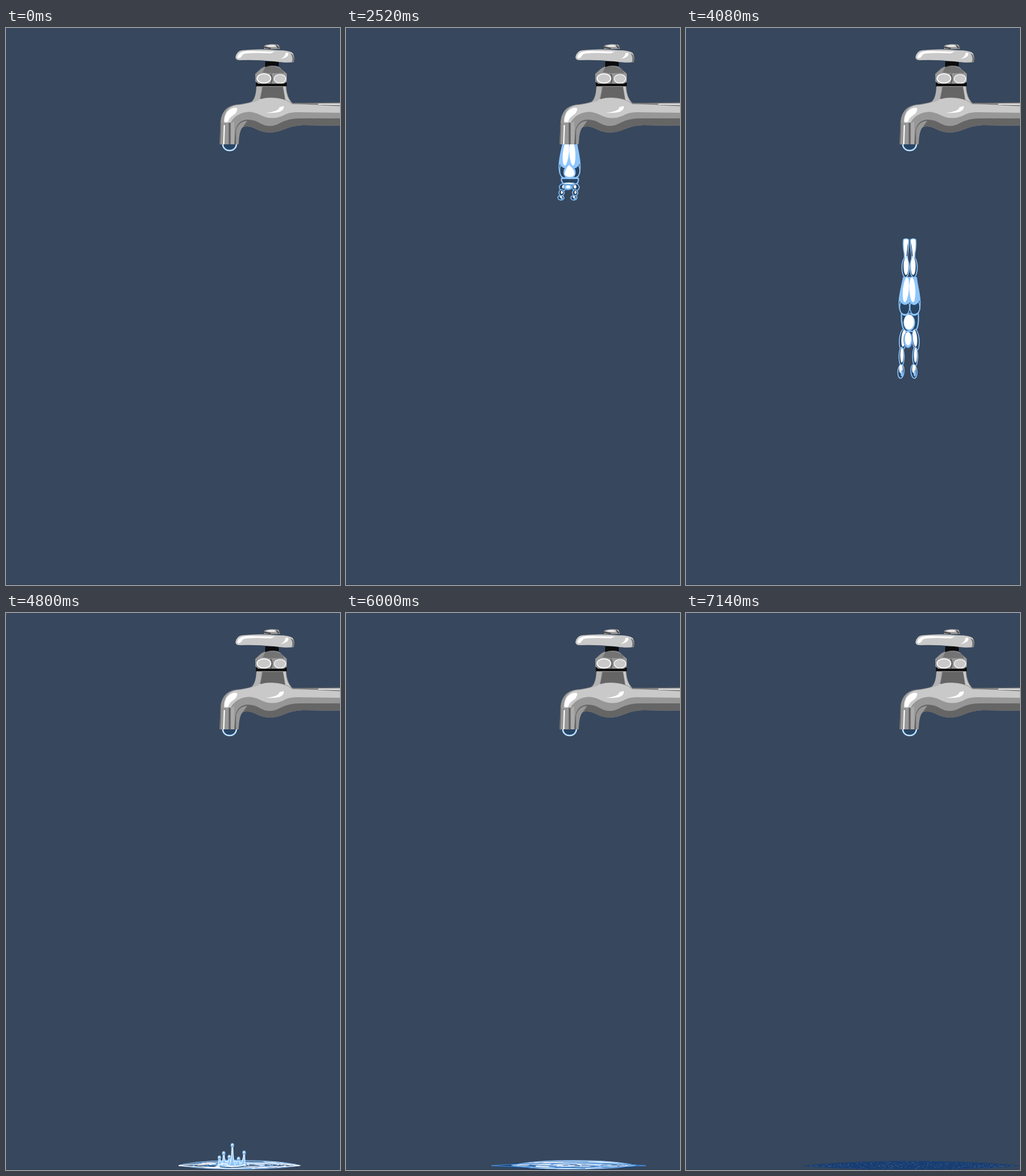
Recreate the animation shown at these times as an HTML page with a canvas. Size 540 by 900 pixels, loop 7.2 s.

```html
<!DOCTYPE html>
<html lang="en">
<head>
<meta charset="utf-8">
<title>Tap</title>
<style>
html, body { margin: 0; width: 100%; height: 100%; overflow: hidden; background: #37475d; }
canvas { display: block; }
</style>
</head>
<body>
<canvas id="stage" width="540" height="900"></canvas>
<script>
const ctx = document.getElementById('stage').getContext('2d');
const LOOP = 7200, STEP = 60, LIP = 188, CX = 361.5, FLOOR = 893;
const BG = '#37475d', NAVY = '#294564', SKY = '#8ec6fb', MID = '#4b8fd6', WHITE = '#fff';
const LIGHT = '#c9c9c9', GREY = '#979797', DARK = '#656565';

const clamp = v => Math.max(0, Math.min(1, v));

// Linear interpolation through [time, value] pairs
function track(t, keys) {
  if (t <= keys[0][0]) return keys[0][1];
  for (let i = 1; i < keys.length; i++) {
    const [t1, v1] = keys[i], [t0, v0] = keys[i - 1];
    if (t <= t1) return v0 + (v1 - v0) * (t - t0) / (t1 - t0);
  }
  return keys[keys.length - 1][1];
}

function random(seed) {
  return () => (seed = (seed * 16807) % 2147483647) / 2147483647;
}

function paint(path, fill, stroke, width = 1) {
  if (fill) { ctx.fillStyle = fill; ctx.fill(path); }
  if (stroke) { ctx.strokeStyle = stroke; ctx.lineWidth = width; ctx.stroke(path); }
}

function shape(d, fill, stroke, width) {
  paint(new Path2D(d), fill, stroke, width);
}

function oval(x, y, rx, ry, fill, stroke, width, turn = 0) {
  const p = new Path2D();
  p.ellipse(x, y, Math.max(rx, 0.1), Math.max(ry, 0.1), turn, 0, Math.PI * 2);
  paint(p, fill, stroke, width);
}

function drawTap() {
  // pipe, elbow and neck
  shape('M345 188L347 151Q349 128 371 124Q389 122 397 119Q404 113 405 93H453Q454 113 463 121L540 121V158L480 157Q462 158 449 164Q425 174 404 163Q392 157 383 160Q376 165 376 188Z', GREY);
  shape('M371 165Q375 149 390 148Q402 148 411 154Q427 163 444 153Q458 146 475 146H540V158L480 157Q462 158 449 164Q425 174 404 163Q392 157 383 160Q376 165 376 188H369Z', DARK);
  shape('M371 125Q390 123 400 119Q413 111 431 113Q450 113 463 123L540 125V137L470 136Q456 136 447 142Q429 150 410 140Q394 132 380 138Q368 143 363 153H352Q352 130 371 125Z', LIGHT);
  shape('M372 165Q376 151 390 150L383 160Q377 165 376 188H372Z', GREY);
  shape('M360 153H363V188H360Z', DARK);
  shape('M364 154L369 151V188H364Z', '#aaaaaa');
  shape('M353 151Q353 137 363 131Q371 127 374 130Q374 137 366 142Q361 145 360 150Q357 154 353 151Z', WHITE);
  shape('M353 157L352 188', null, WHITE, 2);
  shape('M347 153L346 188', null, DARK, 1.5);
  shape('M449 126Q451 139 420 137Q441 135 442 128Z', WHITE);
  shape('M463 122L540 121', null, '#777', 1.5);
  shape('M475 122L540 126', null, '#777', 1);
  shape('M505 123L540 123', null, WHITE, 1.5);
  // neck shading
  shape('M405 95H413Q413 109 408 117L398 120Q405 111 405 95Z', '#b3b3b3');
  shape('M415 95H448L451 116Q430 109 411 115Z', DARK);
  shape('M448 95H452Q453 112 461 120L452 116Z', LIGHT);
  // bonnet and nut
  shape('M404 88H454V94H404Z', '#0c0c0c');
  shape('M412 66Q418 61 430 61Q442 61 446 67L454 74V87L449 90H408L403 86V74Z', GREY);
  shape('M420 62Q434 60 446 67L450 73H414Z', '#737373');
  shape('M404 74Q411 69 428 74Q432 80 428 90H408L403 86Z', GREY);
  shape('M431 75Q444 70 454 75V87L448 90H433Z', GREY);
  shape('M428 74Q432 82 428 90', null, DARK, 2.5);
  oval(417, 81.5, 11, 7.5, LIGHT, WHITE, 1.6);
  oval(443, 82, 9.5, 7, LIGHT, WHITE, 1.2);
  shape('M419 54H441V62Q430 59 419 63Z', '#0c0c0c');
  // handle
  shape('M417 29Q424 25 441 27L443 34H417Z', GREY);
  shape('M419 28Q430 25 440 28L438 31H422Z', LIGHT);
  shape('M417 31L428 33M437 28L441 33', null, '#444', 2);
  shape('M424 29L434 29', null, WHITE, 1.5);
  shape('M371 47Q373 37 382 36Q412 33 440 36Q459 36 464 41Q468 50 465 55Q455 57 434 54Q405 51 378 52Q371 52 371 47Z', LIGHT);
  shape('M460 41Q467 43 466 54L462 55Q465 48 460 41Z', '#737373');
  shape('M374 46Q376 38 390 37L435 38L428 41Q395 39 384 42L379 48Q374 51 374 46Z', WHITE);
  shape('M452 40Q452 46 444 50Q459 47 456 40Z', WHITE);
}

function dropPath(half, bottom, bulge) {
  const h = bottom - LIP, side = half * (1 + 0.15 * bulge);
  const p = new Path2D();
  p.moveTo(CX - half, LIP);
  p.bezierCurveTo(CX - side, LIP + h * 0.56, CX - half * 0.56, bottom, CX, bottom);
  p.bezierCurveTo(CX + half * 0.56, bottom, CX + side, LIP + h * 0.56, CX + half, LIP);
  return p;
}

function drawDrop(bottom) {
  const h = bottom - LIP, grow = clamp((bottom - 199) / 37), half = 11 + 5.5 * grow;
  paint(dropPath(half, bottom - 1, grow), NAVY, SKY, 2.4);
  paint(dropPath(half, bottom - 1, grow), null, WHITE, 0.9);
  if (grow <= 0) return;
  ctx.save();
  ctx.clip(dropPath(half, bottom, grow));
  ctx.globalAlpha *= clamp(grow * 1.6);
  oval(CX + 3, LIP + h * 0.28, half * 0.72, h * 0.44, SKY);
  oval(CX + half * 0.5, LIP + h * 0.54, half * 0.4, h * 0.26, NAVY, SKY, 2, 0.25);
  oval(CX - half * 0.52, LIP + h * 0.48, half * 0.4, h * 0.36, NAVY, SKY, 2, -0.15);
  oval(CX + 2, LIP + h * 0.5, half * 0.36, h * 0.2, SKY);
  oval(CX - 1, LIP + h * 0.08, half * 0.65, h * 0.22, WHITE);
  oval(CX - 3, LIP + h * 0.43, half * 0.25, h * 0.07, WHITE, null, 0, 0.4);
  oval(CX, LIP + h * 0.5, half * 0.72, h * 0.4, null, SKY, 1.4);
  oval(CX, LIP + h * 0.8, half * 0.5, h * 0.11, null, WHITE, 1);
  ctx.restore();
}

// Diver pointing down; y = 0 at the seat, reach scales everything below it.
// sheen goes from 1 (still watery) to 0 (fully formed).
function drawDiver(seat, reach, sheen) {
  const k = reach, solid = 1 - 0.35 * sheen;
  const part = (x, y, rx, ry, gap, turn) => {
    oval(x, y * k, rx, ry * k, NAVY, SKY, 1.5, turn);
    oval(x + gap, (y - ry * 0.15) * k, rx * 0.62 * solid, ry * k * 0.8 * solid, WHITE, null, 0, turn);
  };
  ctx.save();
  ctx.translate(CX, seat);
  if (k > 0.03) {
    const waist = new Path2D();
    waist.moveTo(-13, -4 * k);
    waist.bezierCurveTo(-14, 10 * k, -11, 25 * k, -6, 25 * k);
    waist.lineTo(7, 25 * k);
    waist.bezierCurveTo(14, 24 * k, 15, 8 * k, 14, -4 * k);
    waist.closePath();
    paint(waist, NAVY, SKY, 2);
    const chest = 1 - 0.75 * sheen;
    oval(-0.5, (11 + 9 * sheen) * k, 9.5, 13 * k * chest, SKY);
    oval(-1, (10 + 9 * sheen) * k, 8, 12 * k * chest, WHITE);
    for (const side of [-1, 1]) {
      part(side * 10.5 - 0.5, 39, 5.6, 17, side * -1.2, side * -0.08);
      part(side * 11 - 2, 66, 4.2, 15, 0.5, 0);
      const x = side * 10.5 - 3.5;
      oval(x, 90 * k, 5, 11 * k, NAVY, SKY, 1.5, -side * 0.08);
      oval(x, 86 * k, 3 * solid, 7 * k * solid, WHITE);
      oval(x + 1.5, 93 * k, 1.8, 5 * k, SKY);
    }
    oval(-2.5, 39 * k, 7, 13 * k, SKY, MID, 1);
    oval(-2.5, 37 * k, 5 * solid, 11 * k * solid, WHITE);
  }
  for (const side of [-1, 1]) {
    ctx.save();
    ctx.scale(side, 1);
    shape('M1.5 -123Q6 -126 10 -123Q11 -112 8.5 -100Q8 -95 9 -91L3 -91Q4 -96 2.5 -104Q1 -114 1.5 -123Z', WHITE, SKY, 1.5);
    shape('M2 -119Q4 -112 5 -96L3.5 -96Q3 -108 2 -119Z', NAVY);
    oval(6.6, -78, 5.8, 16, NAVY, SKY, 1.6);
    oval(5.8, -80, 4, 14, WHITE);
    ctx.restore();
  }
  // hips
  shape('M-10 -62C-13 -45 -18 -32 -17 -17C-16 0 -6 2 0 -5C6 2 17 0 17 -17C18 -32 13 -45 11 -62Z', SKY, SKY, 1.6);
  shape('M-16 -24C-10 -15 -4 -17 0 -22C5 -16 11 -15 16 -25C19 -7 12 1 0 -5C-11 1 -19 -6 -16 -24Z', NAVY);
  oval(-8, -14, 8, 13, null, SKY, 1.4);
  oval(8.5, -14, 8, 13, null, SKY, 1.4);
  oval(-6, -42, 4.8, 20, WHITE, null, 0, 0.1);
  oval(4.5, -42, 4.8, 20, WHITE, null, 0, -0.05);
  if (sheen > 0) {
    ctx.globalAlpha *= sheen;
    oval(0, -11, 10, 11, SKY);
    shape('M-1 -23Q9 -15 8 -7Q0 0 -8 -7Q-8 -15 -1 -23Z', WHITE);
  }
  ctx.restore();
}

function lens(l, r, y, up, down) {
  const q = (r - l) * 0.24, p = new Path2D();
  p.moveTo(l, y);
  p.bezierCurveTo(l + q, y - up * 1.33, r - q, y - up * 1.33, r, y);
  p.bezierCurveTo(r - q, y + down * 1.33, l + q, y + down * 1.33, l, y);
  return p;
}

function drawPuddle(t) {
  const l = track(t, [[4500, 340], [4800, 279], [4860, 277], [5640, 261], [6000, 235], [6420, 225], [7140, 188]]);
  const r = track(t, [[4500, 385], [4800, 475], [4860, 478], [5640, 481], [6000, 485], [6420, 509], [7140, 540]]);
  const w = r - l, y = 893, fade = clamp((t - 6000) / 1080);
  const full = clamp((t - 4900) / 900), lit = 1 - fade;
  const pool = lens(l + w * 0.13 * full, r - w * 0.07 * full, y - 0.5, 8, 6);
  ctx.save();
  ctx.globalAlpha = 0.2 + 0.45 * full + 0.2 * fade;
  paint(lens(l, r, y + 0.5, 8, 6), full > 0.5 ? '#123c78' : '#28568d');
  ctx.globalAlpha = (0.25 + 0.5 * full) * lit;
  paint(pool, '#a9cdf2');

  // glints: flat slivers of light drifting outward
  const rnd = random(71), tones = [WHITE, SKY, WHITE, MID, '#e0e0fb', '#24528c', WHITE];
  ctx.save();
  ctx.clip(pool);
  ctx.globalAlpha = lit;
  for (let i = 0; i < 46; i++) {
    const size = 0.1 + 0.38 * rnd(), from = rnd() * 6.28 + t / 1500 * (rnd() - 0.5);
    const span = 0.6 + rnd() * 1.8, dx = (rnd() - 0.5) * w * 0.4;
    ctx.strokeStyle = tones[i % tones.length];
    ctx.lineWidth = 0.8 + rnd();
    ctx.beginPath();
    ctx.ellipse((l + r) / 2 + dx, y + rnd() * 3 - 1.5, w * size, 1.5 + size * 10, 0, from, from + span);
    ctx.stroke();
  }
  ctx.restore();
  ctx.globalAlpha = lit;
  paint(pool, null, SKY, 1.2);
  paint(lens(l, r, y, 4, 3), null, full > 0.5 ? MID : WHITE, 1);

  // faint flecks as the water sinks away
  ctx.globalAlpha = fade * 0.6;
  ctx.fillStyle = '#4f6077';
  for (let i = 0; i < 260; i++) {
    const u = rnd() * 2 - 1, v = (rnd() * 2 - 1) * (1 - u * u);
    ctx.fillRect(Math.round((l + r) / 2 + u * w * 0.47), Math.round(y + v * 7), 2, 1);
  }
  ctx.restore();
}

function drawCrown(t) {
  const rise = track(t, [[4500, 0], [4800, 1], [4920, 1.08], [5460, 0]]);
  if (rise <= 0) return;
  const base = 893, spikes = [[345, 880], [361, 879], [376, 882], [352, 873], [385, 872], [366, 860]];
  ctx.save();
  ctx.globalAlpha = clamp(rise * 3);
  oval(364, base - 3 * rise, 25, 6 * rise, MID, SKY, 1.6);
  oval(364, base - 3 * rise, 20, 4 * rise, SKY, WHITE, 1.6);
  for (const [x, top] of spikes) {
    const y = base + (top - base) * rise, foot = 364 + (x - 364) * 0.85;
    const line = new Path2D();
    line.moveTo(foot - 5, base);
    line.quadraticCurveTo(x - 1, base - 5, x - 0.5, y);
    line.lineTo(x + 0.5, y);
    line.quadraticCurveTo(x + 1, base - 5, foot + 5, base);
    paint(line, SKY, SKY, 1.8);
    paint(line, null, WHITE, 0.9);
    oval(x, y, 2, 2.8, MID, SKY, 1.5);
    oval(x - 0.3, y - 0.8, 1.2, 1.5, WHITE);
  }
  shape(`M342 ${base}Q352 ${base - 6 * rise} 360 ${base}T386 ${base - 2}`, null, WHITE, 1.5);
  shape(`M346 ${base + 2}Q364 ${base + 5} 384 ${base + 1}`, null, NAVY, 1.2);
  ctx.restore();
}

function drawWater(t) {
  const n = Math.max(0, (t - 4080) / STEP), fall = 24 * n + 3.2 * n * n;
  const tip = track(t, [[0, 199], [780, 218], [1320, 230], [1500, 230], [1560, 236], [2280, 266], [3060, 306], [3180, 312], [3300, 312], [3360, 328], [3420, 345], [4080, 567]]) + fall;
  const seat = track(t, [[1560, 236], [3180, 250], [3300, 250], [3420, 254], [4080, 465]]) + fall;
  const head = seat - 125;

  ctx.save();
  ctx.beginPath();
  ctx.rect(0, LIP, 540, FLOOR - LIP);
  ctx.clip();
  if (t > 1560 && head < FLOOR) {
    drawDiver(seat, (tip - seat) / 102, 1 - clamp((t - 3420) / 360));
  }
  const dropFade = 1 - clamp((t - 1560) / 600);
  if (dropFade > 0) {
    ctx.globalAlpha = dropFade;
    drawDrop(Math.min(tip, 236));
  } else if (head > LIP) {
    drawDrop(Math.min(199, LIP + 2 + (head - LIP) / 8));
  }
  ctx.restore();
}

function draw(t) {
  ctx.fillStyle = BG;
  ctx.fillRect(0, 0, 540, 900);
  if (t >= 4500) drawPuddle(t);
  drawWater(t);
  if (t >= 4500) drawCrown(t);
  ctx.fillStyle = '#2f3e53';
  ctx.fillRect(0, 899, 540, 1);
  drawTap();
}

const start = performance.now();
function tick() {
  const t = (performance.now() - start) % LOOP;
  draw(Math.floor(t / STEP) * STEP);
  requestAnimationFrame(tick);
}
tick();
</script>
</body>
</html>
```
